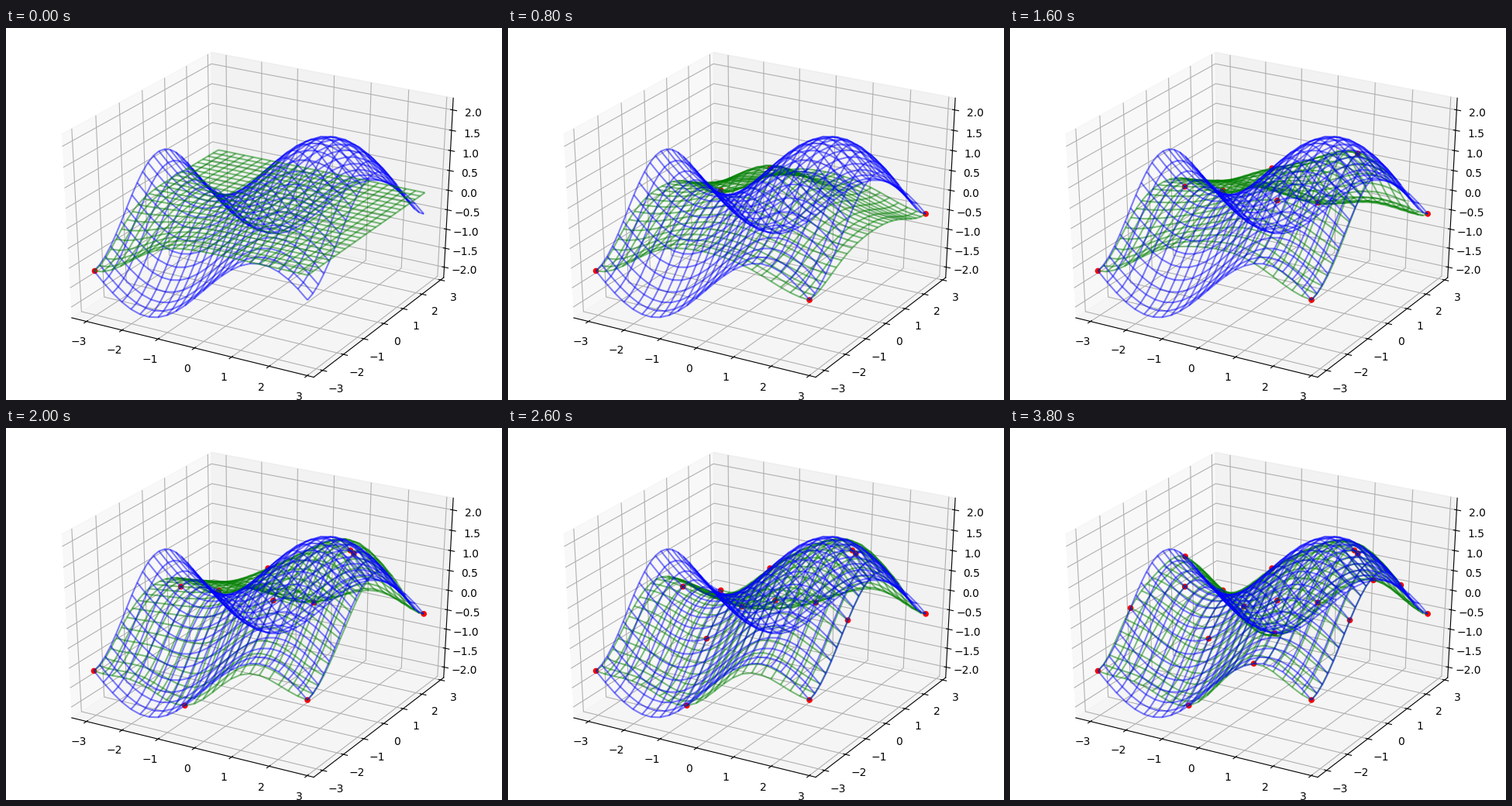
Write a matplotlib script that moves like this. It is 640 px wide and 480 px high and loops after 4000 ms.

```python
import numpy as np
import matplotlib.pyplot as plt
from matplotlib.animation import FuncAnimation
from mpl_toolkits.mplot3d import Axes3D

STEPS = 20
INTERVAL = 200
EXPLORE = 10     # weight of the uncertainty in the acquisition rule
JITTER = 1e-10

axis = np.arange(-3, 3, 0.25)
X, Y = np.meshgrid(axis, axis)
Z = np.sin(X) + np.cos(Y)
grid = np.column_stack([X.ravel(), Y.ravel()])
heights = Z.ravel()


def rbf(a, b):
    return np.exp(-0.5 * ((a[:, None] - b[None]) ** 2).sum(axis=-1))


def learn(steps):
    """Sample where the upper confidence bound peaks, then refit the GP."""
    mean = np.zeros(len(grid))
    dev = np.full(len(grid), 0.5)
    picks, history = [], []
    for _ in range(steps):
        picks.append(int(np.argmax(mean + EXPLORE * dev)))
        pts = grid[picks]
        cov = rbf(pts, pts) + JITTER * np.eye(len(picks))
        cross = rbf(grid, pts)
        mean = cross @ np.linalg.solve(cov, heights[picks])
        var = 1 - (cross * np.linalg.solve(cov, cross.T).T).sum(axis=1)
        dev = np.sqrt(np.maximum(var, 0))
        history.append((list(picks), mean.reshape(X.shape)))
    return history


class StretchedAxes(Axes3D):
    """3D axes that fill their rectangle instead of staying square."""

    def apply_aspect(self, position=None):
        pass


def padded(values):
    """Limits with a 5% margin, widened by 1/48 of the span on each side."""
    lo, hi = values.min(), values.max()
    pad = 0.05 * (hi - lo)
    pad += (hi - lo + 2 * pad) / 48
    return lo - pad, hi + pad


history = learn(STEPS)

fig = plt.figure(figsize=(6.4, 4.8), dpi=100)
ax = StretchedAxes(fig, rect=(0, 0, 1, 1))
fig.add_axes(ax)
ax.view_init(elev=30, azim=-60)
ax.set_box_aspect((1, 1, 1), zoom=np.sqrt(3) / 1.8294640721620434)
ax.set_xlim(*padded(X))
ax.set_ylim(*padded(Y))
ax.set_zlim(*padded(Z))
ax.set_xticks(np.arange(-3, 4))
ax.set_yticks(np.arange(-3, 4))
ax.set_zticks(np.arange(-2, 2.5, 0.5))

shown = []


def update(step):
    while shown:
        shown.pop().remove()
    picks, mean = history[step]
    shown.append(ax.plot_wireframe(X, Y, mean, color='g', alpha=0.5))
    shown.append(ax.plot_wireframe(X, Y, Z, color='b', alpha=0.5))
    shown.append(ax.scatter(*grid[picks].T, heights[picks],
                            c='r', marker='o', alpha=1.0))
    return shown


anim = FuncAnimation(fig, update, frames=STEPS, interval=INTERVAL,
                     repeat=True, repeat_delay=0)
plt.show()
```
